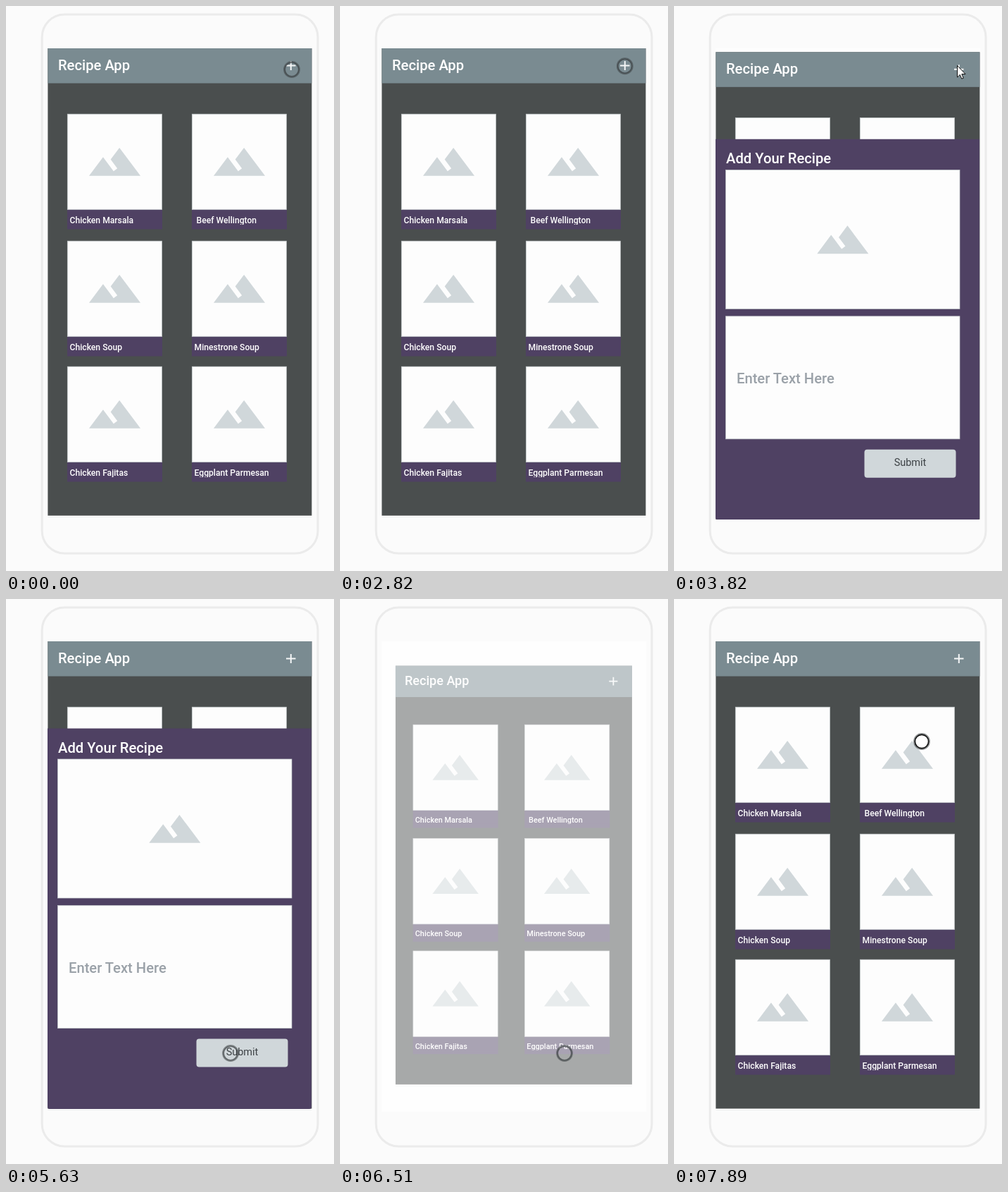
Write an HTML page that moves like this. It is 466 px wide and 801 px high and loops after 8000 ms.

```html
<!DOCTYPE html>
<html lang="en">
<head>
<meta charset="utf-8">
<title>Recipe app prototype</title>
<style>
  html, body { margin: 0; width: 100%; height: 100%; overflow: hidden; background: #fbfbfb; }
  svg { display: block; width: 466px; height: 801px; }
  text { font-family: Roboto, sans-serif; font-weight: 500; fill: #fff; white-space: pre; }
  .title { font-size: 20.2px; }
  .label { font-size: 12.15px; }
  .hint { font-size: 20.2px; fill: #9aa1a8; }
  .button { font-size: 14.5px; font-weight: 400; fill: #3d4245; text-anchor: middle; }
  .box { fill: #fdfdfd; stroke: #c4c9cb; stroke-width: .7; }
  .purple { fill: #4f4163; }
  .icon { fill: #d0d7da; }
</style>
</head>
<body>
<svg viewBox="0 0 466 801">
  <defs>
    <clipPath id="screen"><rect x="59" y="60" width="376" height="668"/></clipPath>
    <path id="hills" class="icon" d="M14 6 10.25 11 13.1 14.8 11.5 16 7 10 1 18H23Z"
      transform="scale(3.32) translate(-1 -6)"/>
  </defs>
  <rect width="466" height="801" fill="#fbfbfb"/>
  <rect x="51.2" y="12" width="391.8" height="764" rx="32" fill="none" stroke="#ebebeb" stroke-width="3"/>
  <rect x="59" y="60" width="376" height="667" fill="#fefefe"/>
  <g clip-path="url(#screen)">
    <g id="home"></g>
    <g id="form"></g>
  </g>
  <g id="ring" fill="none">
    <circle r="10.4" stroke="#3c4144" stroke-opacity=".55" stroke-width="3"/>
    <circle r="10" stroke="#33383a" stroke-opacity=".5" stroke-width="1.2"/>
    <circle id="press" r="9.6" fill="#fff" fill-opacity=".85" stroke="#151515" stroke-width="1.6"/>
  </g>
  <path id="arrow" d="M.5.5V17L4.3 13.4 6.8 19.2 9.2 18.2 6.8 12.5H12Z" fill="#fff" stroke="#111"/>
</svg>
<script>
const LOOP = 8000;
const TICK = 120; // motion is sampled at this pace
const SLIDE = { at: 3580, ms: 300 };
const ZOOM = { at: 6390, ms: 250 };
const PRESS = 7890;
const HEIGHT = 668;

// Each pointer move reaches x, y within n ticks
const moves = [
  { at: 1390, n: 1, x: 406, y: 85 },
  { at: 2820, n: 2, x: 401, y: 86 },
  { at: 3190, n: 1, x: 404, y: 86 },
  { at: 4850, n: 1, x: 406, y: 95 },
  { at: 5000, n: 3, x: 323, y: 626 },
  { at: 5380, n: 3, x: 319, y: 644 },
  { at: 7130, n: 2, x: 366, y: 325 },
  { at: 7370, n: 1, x: 352, y: 202 }
];

const rowTops = [153, 333, 511];
const dishes = [
  "Chicken Marsala", " Beef Wellington",
  "Chicken Soup", "Minestrone Soup",
  "Chicken Fajitas", "Eggplant Parmesan"
];

const $ = id => document.getElementById(id);
const rect = (x, y, w, h, more) => `<rect x="${x}" y="${y}" width="${w}" height="${h}" ${more}/>`;
const text = (x, y, cls, str) => `<text x="${x}" y="${y}" class="${cls}">${str}</text>`;
const hills = (x, y) => `<use href="#hills" transform="translate(${x} ${y})"/>`;

function card(name, i) {
  const row = i >> 1;
  const x = 87 + 177 * (i % 2);
  const y = rowTops[row];
  // Labels of the outer rows lose the tips of their descenders
  const mask = row === 1 ? "" : rect(x + 1, y + 157, 133, 5, 'class="purple"');
  return rect(x, y + 135, 135, 28.5, 'class="purple"') +
    rect(x + .3, y + .2, 134.2, 135.5, 'class="box"') +
    hills(x + 31, y + 48) +
    text(x + 3.5, y + 155, "label", name) + mask;
}

const base =
  rect(59.4, 724, 375, 2, 'fill="#f4f5f5"') +
  rect(59.4, 60, 375, 662.5, 'fill="#4a4e4e"') +
  rect(59.4, 60, 375, 49.5, 'fill="#7a8b91"') +
  text(74, 91, "title", "Recipe App") +
  '<path d="M398 84.5H411.5M404.8 78V91" stroke="#f4f6f6" stroke-width="2"/>' +
  dishes.map(card).join("");

const sheet =
  '<path class="purple" d="M59 183.5H434V720Q434 723 431 723H62Q59 723 59 720Z"/>' +
  text(74, 218, "title", "Add Your Recipe") +
  rect(73.5, 227, 332.5, 197, 'class="box"') +
  hills(203.3, 306) +
  rect(73.5, 434.5, 332.5, 174, 'class="box"') +
  text(89, 530, "hint", "Enter Text Here") +
  rect(270.5, 623.5, 130, 40, 'rx="4" class="icon"') +
  text(335.5, 647, "button", "Submit");

$("home").innerHTML = base;
$("form").innerHTML = base + sheet;

const ticks = (t, at) => Math.floor((t - at) / TICK);
const progress = (move, t) => Math.min(1, ticks(t, move.at) * TICK / move.ms);
const show = (id, on) => $(id).setAttribute("display", on ? "inline" : "none");
const place = (id, value) => $(id).setAttribute("transform", value);

function pointer(t) {
  let x = 406, y = 90;
  for (const m of moves.filter(m => m.at <= t)) {
    const f = Math.min(1, (ticks(t, m.at) + 1) / m.n) ** 2;
    x += (m.x - x) * f;
    y += (m.y - y) * f;
  }
  return `translate(${x} ${y})`;
}

function draw(t) {
  const onForm = t >= SLIDE.at && t < ZOOM.at;
  const sliding = onForm && ticks(t, SLIDE.at) < 3;
  const spot = pointer(t);

  show("home", !onForm);
  show("form", onForm);
  place("form", `translate(0 ${HEIGHT * (1 - progress(SLIDE, t)) ** 3})`);

  const zoom = t < ZOOM.at ? 1 : progress(ZOOM, t);
  place("home", `translate(247 393.5) scale(${.8 + .2 * zoom}) translate(-247 -393.5)`);
  $("home").setAttribute("opacity", zoom);

  show("arrow", sliding);
  show("ring", !sliding);
  show("press", t >= PRESS);
  place("arrow", `${spot} translate(-2 -2)`);
  place("ring", spot);
}

const start = performance.now();
function frame() {
  draw((performance.now() - start) % LOOP);
  requestAnimationFrame(frame);
}
frame();
</script>
</body>
</html>
```
